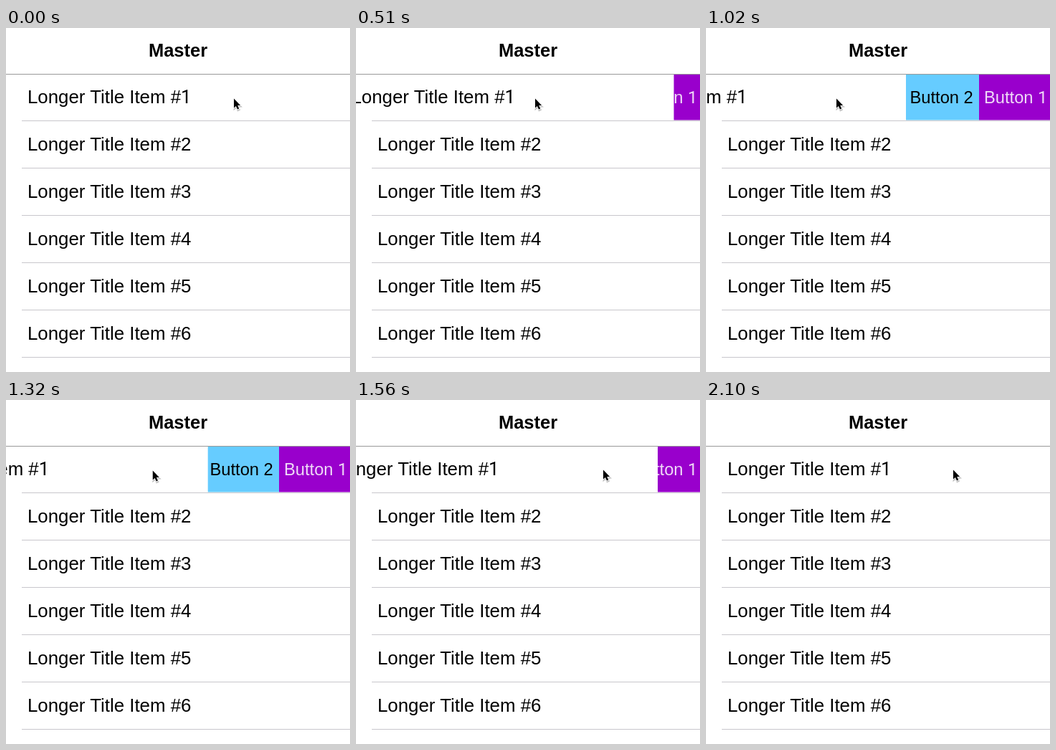
Recreate the animation shown at these times as an HTML page. Size 480x480 px, loop 2.31 s.

```html
<!DOCTYPE html>
<html lang="en">
<head>
<meta charset="utf-8">
<title>Swipe to reveal</title>
<style>
  html, body { margin: 0; width: 100%; height: 100%; overflow: hidden; background: #fff; }
  svg { display: block; width: 100%; height: 100%; }
  text { font: 25.85px "Liberation Sans", Arial, sans-serif; white-space: pre; }
  .title { font-size: 25.5px; font-weight: bold; text-anchor: middle; }
  .button { font-size: 23.7px; }
  .one { font-family: Roboto, sans-serif; }
</style>
</head>
<body>
<svg viewBox="0 0 480 480">
  <defs>
    <path id="arrow" d="M0 0V13L2.9 10.4L5 15.1L7.2 14.1L5.2 9.5H9.1Z"/>
  </defs>
  <text class="title" x="240" y="40">Master</text>
  <rect x="279" y="65" width="102" height="63.5" fill="#66ccff"/>
  <rect x="381" y="65" width="99" height="63.5" fill="#9900cc"/>
  <text class="button" x="284.5" y="105">Button 2</text>
  <text class="button" x="388" y="105" fill="#efd9f7">Button <tspan class="one">1</tspan></text>
  <g id="cell">
    <rect y="65" width="480" height="64" fill="#fff"/>
    <text x="30" y="105">Longer Title Item #<tspan class="one">1</tspan></text>
  </g>
  <g id="rows"></g>
  <rect y="64" width="480" height="1" fill="#999"/>
  <g id="cursor">
    <use href="#arrow" x=".5" y="1.5" stroke="#000" stroke-width="2" opacity=".25"/>
    <use href="#arrow" stroke="#fff" stroke-width="1.6" paint-order="stroke"/>
  </g>
</svg>
<script>
  const LOOP = 2310, STEP = 30;
  const cell = document.getElementById("cell");
  const cursor = document.getElementById("cursor");

  let rows = "";
  for (let i = 0; i < 6; i++) {
    const y = 66 * i;
    rows += `<rect x="22" y="${129 + y}" width="458" height="1" fill="#c8c7cc"/>`;
    if (i) rows += `<text x="30" y="${105 + y}">Longer Title Item #${i + 1}</text>`;
  }
  document.getElementById("rows").innerHTML = rows;

  const linear = p => p;
  const easeIn = p => p ** 2;
  const easeOut = p => 1 - (1 - p) ** 2;

  // Moves from one value to another between two times, as an amount to add.
  const move = (time, start, end, distance, ease) =>
    distance * ease(Math.min(1, Math.max(0, (time - start) / (end - start))));

  const pointerX = t => 318
    - move(t, 0, STEP, 4, linear)
    - move(t, 330, 510, 64, easeIn)
    - move(t, 510, 630, 68, linear)
    + move(t, 1200, 1440, 91, easeIn)
    + move(t, 1440, 1560, 72, linear);

  const revealed = t =>
    move(t, 390, 510, 36.5, easeIn)
    + move(t, 510, 630, 150, linear)
    + move(t, 630, 720, 14.5, easeOut)
    - move(t, 1290, 1440, 67, easeIn)
    - move(t, 1440, 1560, 75, linear)
    - move(t, 1560, 1680, 59, easeOut);

  function draw() {
    const time = Math.floor(performance.now() % LOOP / STEP) * STEP;
    const y = 98.5 - move(time, 1440, 1560, 1, linear);
    cell.setAttribute("transform", `translate(${-revealed(time)} 0)`);
    cursor.setAttribute("transform", `translate(${pointerX(time)} ${y})`);
    requestAnimationFrame(draw);
  }
  draw();
</script>
</body>
</html>
```
